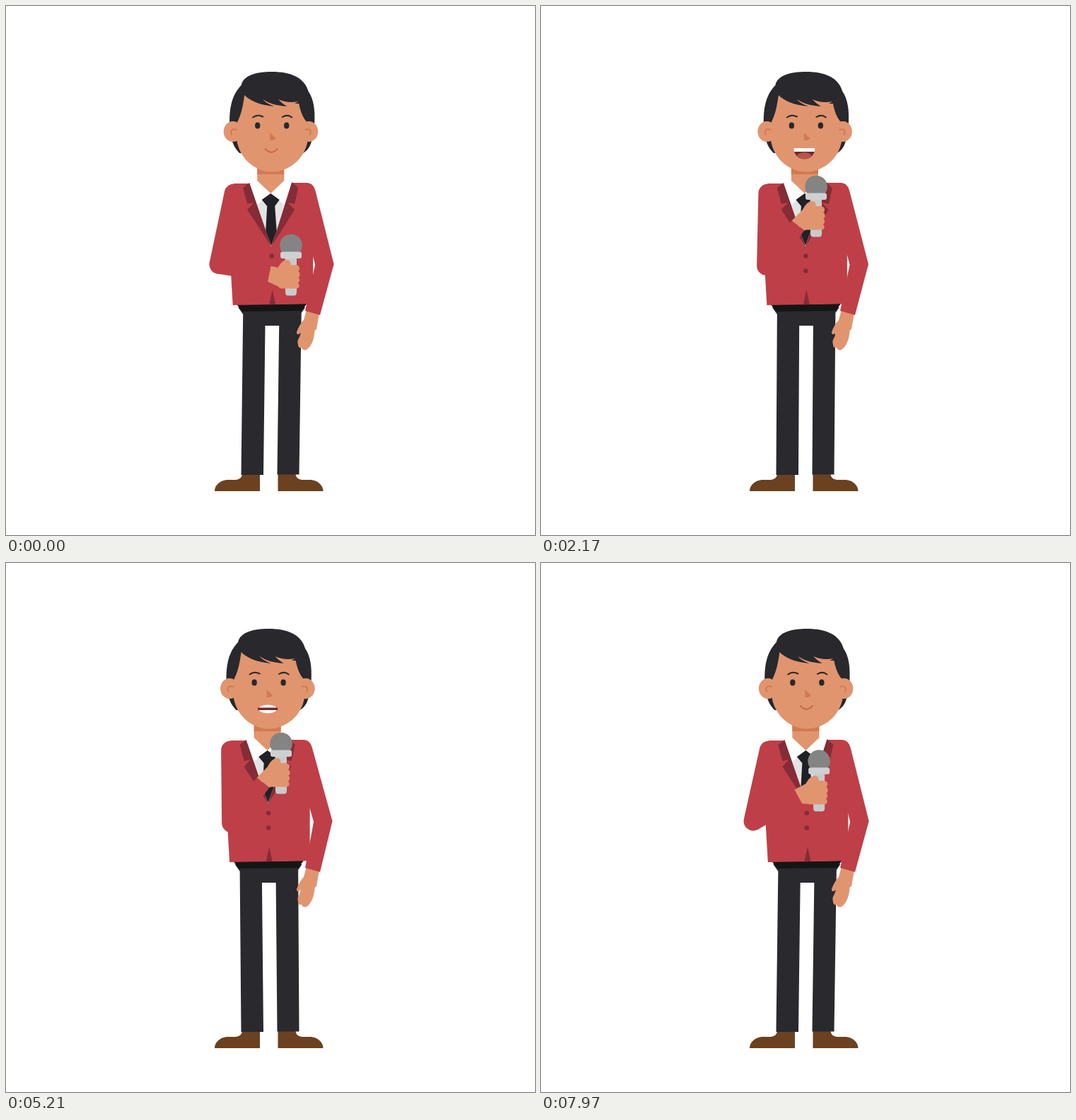
Write an HTML page that moves like this. It is 748 px wide and 748 px high and loops after 8 s.

```html
<!DOCTYPE html>
<html lang="en">
<head>
<meta charset="utf-8">
<title>Presenter</title>
<style>
  html, body { margin: 0; width: 100%; height: 100%; overflow: hidden; background: #fff; }
  svg { display: block; width: 100vw; height: 100vh; }
  .skin { fill: #e0956f; }
  .shade { fill: #d27a52; }
  .hair { fill: #28282d; }
  .red { fill: #be3f48; }
  .lapel { fill: #852c36; }
  .pants { fill: #2a292e; }
  .shoe { fill: #6b4120; }
  .white { fill: #fff; }
  .dark { fill: #74292c; }
  .line { fill: none; stroke-width: 2; stroke-linecap: round; }
</style>
</head>
<body>
<svg viewBox="0 0 748 748">
  <defs>
    <path id="shoe" d="M295 686C295 678 302 671 312 670H325C331 669 333 667 334 662H359V686Z"/>
    <clipPath id="openClip"><path id="open" d="M358.5 201H388.5C388.5 211 382 216.5 373.5 216.5S358.5 211 358.5 201Z"/></clipPath>
    <clipPath id="wideClip"><path d="M360 199.5H391C391 207 386 212.5 375.5 212.5S360 207 360 199.5Z"/></clipPath>
  </defs>

  <use href="#shoe" class="shoe"/>
  <use href="#shoe" class="shoe" transform="matrix(-1 0 0 1 743.5 0)"/>
  <path id="legs" class="pants"/>

  <g id="body">
    <path fill="#151516" d="M326 422L425 421L418 431L334 432Z"/>
    <path class="hair" d="M318 185C320 195 324 202 330 208H420C428 203 432 195 433 185Z"/>
    <path class="red" d="M322 251H344L375 340L404 250H425L434 300V421L320.5 423L311 262Z"/>
    <path fill="#e4e4e4" d="M344 250H404L375 340Z"/>
    <path class="skin" d="M355 228H393V249L374 266L355 249Z"/>
    <path class="shade" d="M355 228H393V238H355Z"/>
    <path class="white" d="M344 251L355 247L374 265L362 275L355 281ZM404 250L393 247L374 265L386 275L393 281Z"/>
    <path fill="#202126" d="M374 265L386.5 274L380 283L382.5 318L375 339L367 318L369 283L361.5 274Z"/>
    <path class="lapel" d="M344 250L335 257L341 280L350 278L341 288L375 340L367 317ZM404 249L413 257L408 280L398 278L408 288L375 340L383 317ZM376.5 401L372 422.5L381 422Z"/>
    <circle class="lapel" cx="375.5" cy="353.5" r="3.3"/>
    <circle class="lapel" cx="375.5" cy="374.5" r="3.3"/>

    <path class="hair" d="M316 166C315.500 140 321 124 332.500 112C335 98 354 93 376 93C402 93 422 101 427.500 121C435 132 437 147 436 166Z"/>
    <ellipse class="skin" cx="320.500" cy="177.500" rx="13" ry="14.500"/>
    <ellipse class="skin" cx="428" cy="177.500" rx="13" ry="14.500"/>
    <path class="skin" d="M337 126C345 134 358 140 379 142C372 139 366 136 363 132C372 138 383 141 397 142C393 139 388 136 385 132C394 136 403 137 413 135L408 138L414 138C416 148 419 157 425 164L426.500 190C422 218 398 234.500 376 234.500S331 218 326 190L327 164C333 152 335 140 337 126Z"/>
    <g class="line" stroke="#d27a52">
      <path d="M319 182C316 176 320 173 326 175"/>
      <path d="M429.500 182C432.500 176 428.500 173 423 175"/>
    </g>
    <g class="line" stroke="#28282d">
      <path d="M349 157.500Q355 152.500 363 156.500"/>
      <path d="M390.500 157Q398 152.500 404 157.500"/>
    </g>
    <ellipse class="hair eye" cx="355.500" cy="169" rx="3.700" ry="4.500"/>
    <ellipse class="hair eye" cx="396.500" cy="169" rx="3.700" ry="4.500"/>
    <path class="shade" d="M373 179L381.500 187Q380 190.500 373 190Z"/>

    <path id="smile" class="line mouth" stroke="#c8694a" d="M366.500 202Q375 211.500 383.500 202"/>
    <g id="mouthA" class="mouth" clip-path="url(#openClip)">
      <use href="#open" class="dark"/>
      <ellipse cx="373.500" cy="213.500" rx="11" ry="6.500" fill="#b5544d"/>
      <path class="white" d="M358 201H389V206H358Z"/>
    </g>
    <g id="mouthB" class="mouth">
      <ellipse class="white" cx="374.500" cy="206.500" rx="13" ry="6"/>
      <path class="dark" d="M360.500 204.500H388.500V208H360.500Z"/>
    </g>
    <g id="mouthC" class="mouth" clip-path="url(#wideClip)">
      <path class="white" d="M360 199H391V213H360Z"/>
      <path class="dark" d="M360 203.500H391V207.500H360ZM360 199H361.500V207H360ZM386 207L391 203V211H384Z"/>
    </g>
  </g>

  <path class="skin" d="M425 429L443 434L439 457L436.500 459C436 472 431 482 425 486Q420 488 418 483Q413 484 413 479Q411 474 415 468L417 462Q411 467 411 461Q415 450 421 444Z"/>
  <path id="sideArm" class="red"/>

  <path id="upperArm" fill="none" stroke="#be3f48" stroke-width="27" stroke-linecap="round"/>
  <path id="foreArm" class="red"/>
  <g id="mic">
    <path fill="#c9cacb" d="M394.500 355H411V405Q411 409.500 407 409.500H399Q395 409.500 395 405Z"/>
    <circle cx="403" cy="338.500" r="15.800" fill="#848484"/>
    <rect x="388" y="347.500" width="30" height="9.500" rx="3" fill="#cfd0d1"/>
  </g>
  <path id="wrist" class="skin"/>
  <path id="fist" class="skin" d="M384 371C387 365 391 359.500 397 359Q402 359 402.500 364V366H410Q415 367 415 371Q415 374 413 375Q415.500 376 415.500 379.500T413 384Q415.500 385 415 388T412.500 392Q415 393 414.500 396Q414 399.500 410 399.500H389Q384 398 383 392Z"/>
</svg>
<script>
const $ = id => document.getElementById(id);
const LOOP = 8000, UPPER = 102.5, FORE = 87.6, CUFF = 72.6;
const MOUTHS = "ABACA";

const clamp = v => Math.min(1, Math.max(0, v));
const smooth = v => { v = clamp(v); return v * v * (3 - 2 * v); };
const poly = points => "M" + points.map(p => p.map(n => n.toFixed(2)).join(" ")).join("L") + "Z";

// Point at a distance along a unit direction, shifted sideways
const along = ([x, y], [dx, dy], dist, side) => [x + dx * dist - dy * side, y + dy * dist + dx * side];

function drawMicArm(sway, lift) {
  const mx = -14 * lift, my = -83 * lift;
  const shoulder = [322 + sway, 265], palm = [387 + mx, 381.8 + my];
  const dx = palm[0] - shoulder[0], dy = palm[1] - shoulder[1], reach = Math.hypot(dx, dy);
  const bend = Math.acos((UPPER ** 2 + reach ** 2 - FORE ** 2) / (2 * UPPER * reach));
  const angle = Math.atan2(dy, dx) + bend;
  const elbow = along(shoulder, [Math.cos(angle), Math.sin(angle)], UPPER, 0);
  const dir = [(palm[0] - elbow[0]) / FORE, (palm[1] - elbow[1]) / FORE];
  const cuffTop = along(elbow, dir, CUFF, -11.5), cuffBottom = along(elbow, dir, CUFF, 11);

  $("upperArm").setAttribute("d", `M${shoulder}L${elbow}`);
  $("foreArm").setAttribute("d", poly([
    along(elbow, dir, 0, -13.5), cuffTop, cuffBottom, along(elbow, dir, 0, 13.5)]));
  $("wrist").setAttribute("d", poly([
    cuffTop, [385 + mx, 370 + my], [400 + mx, 380 + my], [390 + mx, 399 + my], cuffBottom]));
  for (const id of ["mic", "fist"]) $(id).setAttribute("transform", `translate(${mx} ${my})`);
}

function drawBody(s) {
  $("body").setAttribute("transform", `translate(${s} 0)`);
  $("legs").setAttribute("d", poly([
    [328 + s, 426], [335 + s, 436], [332.5, 663], [364, 663], [366.3 + s, 452],
    [386 + s, 452], [383.5, 662.5], [414.5, 662.5], [417.5 + s, 434], [423 + s, 426]]));
  const e = s * 0.45;
  $("sideArm").setAttribute("d",
    `M${412 + s} 250H${426 + s}Q${435 + s} 251 ${437.5 + s} 262L${463.5 + e} 365L444 437L423 431` +
    `L${437 + e} 366L${418 + s} 290Z`);
}

function drawFace(t) {
  const talking = t >= 1000 && t < 7500;
  const shape = talking ? "mouth" + MOUTHS[Math.floor(t / 200) % MOUTHS.length] : "smile";
  document.querySelectorAll(".mouth").forEach(m => m.style.display = m.id === shape ? "" : "none");
  const open = clamp(Math.abs(t % 3000 - 1230) / 90);
  document.querySelectorAll(".eye").forEach(e => e.setAttribute("ry", 0.6 + 3.9 * open));
}

function frame() {
  const t = performance.now() % LOOP;
  const sway = -2.95 + 3.6 * Math.cos(2 * Math.PI * (t / 2000 - 0.92));
  drawBody(sway);
  drawFace(t);
  drawMicArm(sway, smooth(t / 1000) - smooth((t - 7610) / 1000));
  requestAnimationFrame(frame);
}
frame();
</script>
</body>
</html>
```
